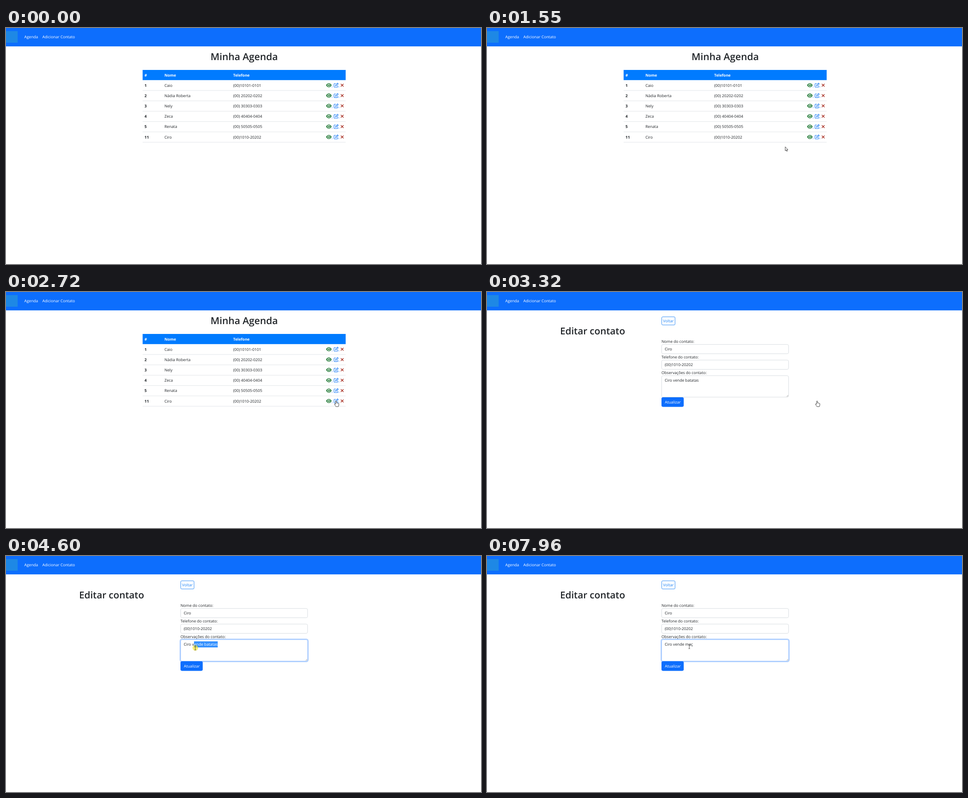
An HTML page that plays this animation: 1059 by 529 pixels, repeating every 8000 ms.

```html
<!DOCTYPE html>
<html lang="pt">
<head>
<meta charset="utf-8">
<title>Minha Agenda</title>
<style>
  html, body { margin: 0; width: 100%; height: 100%; overflow: hidden; background: #fff; }
  svg { display: block; width: 1059px; height: 529px; }
  text {
    font: 8.7px "Open Sans", "Noto Sans", sans-serif;
    fill: #212529; white-space: pre; text-rendering: geometricPrecision;
  }
  .bold { font-weight: 700; font-size: 8.6px; }
  .white { fill: #fff; }
  .field { fill: #fff; stroke: #ced4da; stroke-width: .8; }
  .pointer { fill: #fff; stroke: #111; stroke-width: .8; stroke-linejoin: round; }
</style>
</head>
<body>
<svg xmlns="http://www.w3.org/2000/svg" viewBox="0 0 1059 529">
  <defs>
    <g id="icons">
      <path d="M0 0C2.6-6.1 9.4-6.1 12 0C9.4 6.1 2.6 6.1 0 0Z" fill="#14722a"/>
      <circle cx="6" r="2.7" fill="#14722a" stroke="#fff" stroke-width="1.1"/>
      <path d="M6-1.7A1.7 1.7 0 0 1 4.3 0" fill="none" stroke="#fff" stroke-width=".9"/>
      <path d="M12.3 4h1.8M27.5 4h1.8" stroke="#0d6efd" stroke-width=".7"/>
      <g fill="none" stroke="#1a7bf5" stroke-width="1.1" stroke-linejoin="round">
        <path d="M21.5-3.7H18.6Q17.5-3.7 17.5-2.6V3.4Q17.5 4.5 18.6 4.5H24.8Q25.9 4.5 25.9 3.4V.8"/>
        <path d="M20.6 1.6L21.1-.5L25.3-4.7L27 -3L22.8 1.2Z"/>
      </g>
      <path d="M32.7-3L38.7 3M38.7-3L32.7 3" stroke="#a5281b" stroke-width="1.4"/>
    </g>
    <clipPath id="clip"><rect id="clipBox" y="191" height="14"/></clipPath>
  </defs>

  <rect width="1059" height="529" fill="#fff"/>
  <rect width="1059" height="41.2" fill="#0d6efd"/>
  <rect y="7" width="26" height="26" fill="#1e88e5"/>
  <text class="white" x="40.8" y="23.1">Agenda</text>
  <text class="white" x="80.9" y="23.1">Adicionar Contato</text>

  <g id="list">
    <text x="531" y="72.4" text-anchor="middle" style="font-size:21.6px;font-weight:600">Minha Agenda</text>
    <rect x="304.6" y="94" width="452.7" height="22.8" fill="#007bff"/>
    <text class="bold white" x="308.8" y="108.5">#</text>
    <text class="bold white" x="353.2" y="108.5">Nome</text>
    <text class="bold white" x="506.6" y="108.5">Telefone</text>
    <g id="rows"></g>
    <g id="status">
      <path d="M0 514.6H138Q140.3 514.6 140.3 517V529" fill="#fff" stroke="#d8dade" stroke-width=".8"/>
      <text x="4.6" y="525" style="font-size:6.8px;fill:#8b8f94">localhost/cadernoAmigos/edit.php?id=11</text>
    </g>
  </g>

  <g id="form">
    <text x="162.9" y="94.6" style="font-size:21.2px;font-weight:600">Editar contato</text>
    <rect x="389.6" y="55.7" width="29.6" height="18.2" rx="2.2" fill="#fff" stroke="#1a80f5" stroke-width=".9"/>
    <text x="404.4" y="68.4" text-anchor="middle" style="fill:#1a80f5">Voltar</text>
    <text x="389" y="113.9">Nome do contato:</text>
    <rect class="field" x="389.4" y="117.6" width="283" height="20.8" rx="3.2"/>
    <text x="396.3" y="131.3">Ciro</text>
    <text x="389" y="148.9">Telefone do contato:</text>
    <rect class="field" x="389.4" y="152.6" width="283" height="20.8" rx="3.2"/>
    <text x="396.3" y="166.3">(00)1010-20202</text>
    <text x="389" y="184">Observações do contato:</text>
    <rect id="ring" x="388.2" y="186.4" width="285.4" height="50.4" rx="4" fill="none" stroke="#0d6efd" stroke-opacity=".3" stroke-width="2.3"/>
    <rect id="area" class="field" x="389.4" y="187.6" width="283" height="48" rx="3.2"/>
    <path d="M667.8 234.6L671.4 231M669.8 234.7L671.5 233" stroke="#777" stroke-width=".6"/>
    <text id="note" x="396.3" y="201.4"></text>
    <rect id="mark" y="191.3" height="13.6" fill="#3390ff"/>
    <text id="noteLit" class="white" x="396.3" y="201.4" clip-path="url(#clip)">Ciro vende batatas</text>
    <rect id="caret" y="192.4" width=".7" height="11.4" fill="#222"/>
    <rect x="389" y="236" width="49.6" height="21.4" rx="3.3" fill="#0d6efd"/>
    <text class="white" x="396.4" y="250.1">Atualizar</text>
  </g>

  <g id="cursor">
    <circle id="press" r="6.2" fill="#f5e52c" fill-opacity=".65"/>
    <path id="arrow" class="pointer" d="M.3.4V9.2L2.3 7.4L3.7 10.5L5 9.9L3.7 6.9H6.4Z"/>
    <path id="hand" class="pointer" d="M-1.1 7.6V1.3Q-1.1.3-.1.3T.9 1.3V4.6Q2.3 4 2.8 5Q4.1 4.5 4.5 5.6Q6 5.3 6 6.8V9Q6 10.8 4.9 12.9H-.4Q-1.4 11.2-2.9 9.2Q-4.2 7.4-3.4 6.8Q-2.6 6.3-1.1 7.6Z"/>
    <path id="beam" d="M-1.7-4.9Q0-4.9 0-4V4Q0 4.9-1.7 4.9M1.7-4.9Q0-4.9 0-4M0 4Q0 4.9 1.7 4.9" fill="none" stroke="#222" stroke-width=".8"/>
  </g>
</svg>
<script>
const LOOP = 8000;
const $ = id => document.getElementById(id);
const show = (id, on) => { $(id).style.display = on ? '' : 'none'; };

const contacts = [
  [1, 'Caio', '(00)10101-0101'],
  [2, 'Nádia Roberta', '(00) 20202-0202'],
  [3, 'Nely', '(00) 30303-0303'],
  [4, 'Zeca', '(00) 40404-0404'],
  [5, 'Renata', '(00) 50505-0505'],
  [11, 'Ciro', '(00)1010-20202']
];
$('rows').innerHTML = contacts.map(([id, name, phone], i) => {
  const y = 128.3 + i * 23.2;
  return `<text class="bold" x="308.8" y="${y + 3.3}">${id}</text>
    <text x="353.2" y="${y + 3.3}">${name}</text>
    <text x="506.4" y="${y + 3.3}">${phone}</text>
    <use href="#icons" x="713.8" y="${y - .1}"/>
    <path d="M304.6 ${y + 11.8}H757.3" stroke="#dee2e6" stroke-width=".9"/>`;
}).join('');

// start, end, number of steps, pointer, evenly timed points
const moves = [
  [310, 1070, 11, 'arrow', [[1017, 521], [830, 400], [640, 305], [547, 281.2], [546.3, 281]]],
  [1140, 1900, 11, 'arrow', [[548, 281], [590, 277], [655, 268], [708, 257], [728, 251]]],
  [1970, 2380, 6, 'hand', [[731, 250.5], [733.5, 249.3], [737.5, 245], [737, 243.8]]],
  [2520, 2720, 3, 'hand', [[737, 243.8], [736, 244]]],
  [3580, 4330, 10, 'arrow', [[735, 247], [702, 254], [612, 232], [515, 205], [474, 198]]],
  [4400, 4600, 3, 'beam', [[474, 198], [462, 200], [440, 203], [422, 206]]],
  [4860, 5340, 6, 'beam', [[424, 206], [432, 207], [446, 207]]],
  [5690, 5830, 2, 'beam', [[446, 207], [449, 205], [451, 203]]]
];

// time, first selected character
const picks = [[0, 18], [4460, 14], [4530, 10], [4600, 6], [4930, 7], [5070, 8], [5140, 9], [5210, 10], [5275, 11]];

// time, text in the notes box
const notes = [[0, 'Ciro vende batatas'], [6300, 'Ciro vende '], [6700, 'Ciro vende m'], [6830, 'Ciro vende ma'], [7430, 'Ciro vende maç']];

const latest = (table, t) => table.filter(row => row[0] <= t).pop();
const ramp = (t, a, b) => Math.min(1, Math.max(0, (t - a) / (b - a)));
const within = (t, a, b) => t >= a && t < b;

function pointAt(points, u) {
  const s = u * (points.length - 1);
  const i = Math.min(Math.floor(s), points.length - 2);
  return points[i].map((v, axis) => v + (points[i + 1][axis] - v) * (s - i));
}

function drawCursor(t) {
  const move = latest(moves, t);
  show('cursor', move);
  if (!move) return;
  const [start, end, steps, kind, points] = move;
  const u = Math.floor(ramp(t, start, end) * steps + .15) / steps;
  const [x, y] = pointAt(points, u);
  const shape = kind === 'arrow' && t > 3580 && x < 672 ? 'beam' : kind;
  for (const id of ['arrow', 'hand', 'beam']) show(id, id === shape);
  show('press', within(t, 2310, 2590) || within(t, 4400, 5690));
  $('cursor').setAttribute('transform', `translate(${x} ${y})`);
}

function drawNotes(t) {
  const focus = ramp(t, 4380, 4530);
  $('ring').style.opacity = focus;
  $('area').style.stroke = focus > 0 ? '#86b7fe' : '';

  const note = $('note');
  const value = latest(notes, t)[1];
  if (note.textContent !== value) note.textContent = value;

  const first = latest(picks, t)[1];
  const picked = first < 18 && t < 6300;
  show('mark', picked);
  show('noteLit', picked);
  if (picked) {
    const left = note.getStartPositionOfChar(first).x;
    const right = note.getEndPositionOfChar(17).x;
    for (const id of ['mark', 'clipBox']) {
      $(id).setAttribute('x', left);
      $(id).setAttribute('width', right - left);
    }
  }

  const caretOn = within(t, 6300, 7960);
  show('caret', caretOn);
  if (caretOn) $('caret').setAttribute('x', note.getEndPositionOfChar(value.length - 1).x);
}

function draw(t) {
  const editing = t >= 3320;
  show('list', !editing);
  show('form', editing);
  $('status').style.opacity = ramp(t, 1930, 2100) * (1 - ramp(t, 2510, 2720));
  if (editing) drawNotes(t);
  drawCursor(t);
}

const begin = performance.now();
function tick() {
  draw((performance.now() - begin) % LOOP);
  requestAnimationFrame(tick);
}
tick();
</script>
</body>
</html>
```
